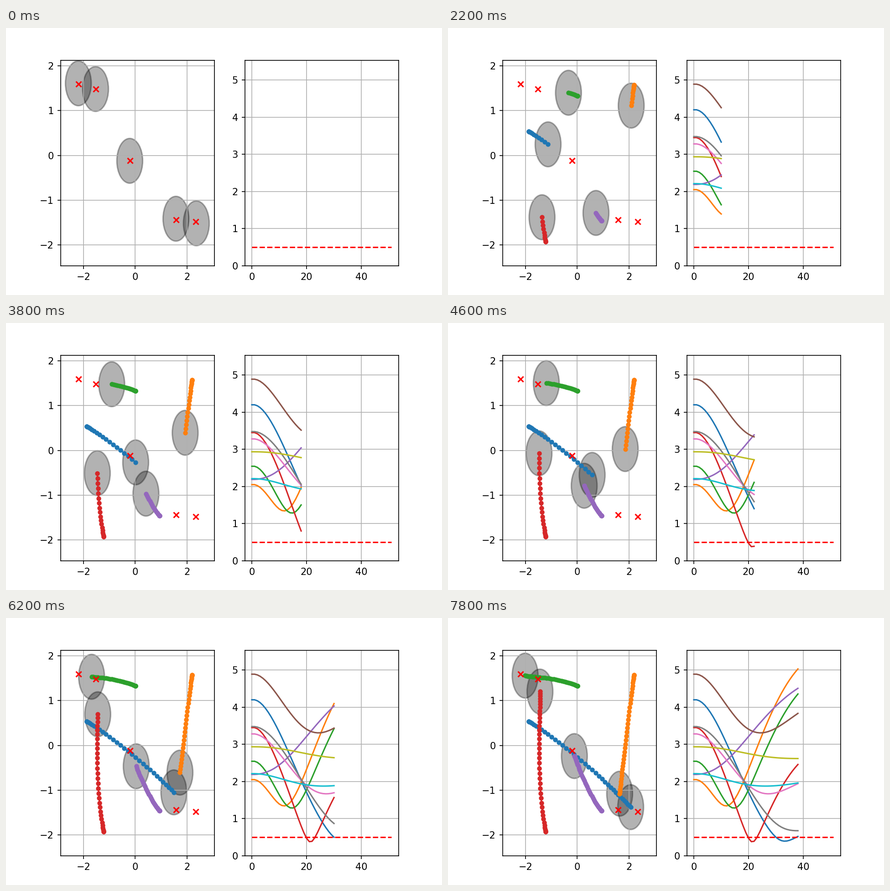
Write a matplotlib script that moves like this. It is 956 px wide and 586 px high and loops after 8000 ms.

```python
from itertools import combinations

import matplotlib.pyplot as plt
import numpy as np
from matplotlib.animation import FuncAnimation

WIDTH, HEIGHT, DPI = 956, 586, 150
FRAMES, INTERVAL = 40, 200
STEPS = 51
RADIUS = 0.5

# Each agent: start, two points on the way (at steps VIA), final position
VIA = (18, 38)
AGENTS = [
    [(-1.877, 0.536), (0.018, -0.266), (2.069, -1.377), (2.365, -1.515)],
    [(2.196, 1.574), (1.933, 0.394), (1.642, -1.077), (1.576, -1.413)],
    [(0.020, 1.325), (-0.908, 1.478), (-2.016, 1.559), (-2.200, 1.610)],
    [(-1.220, -1.927), (-1.467, -0.507), (-1.441, 1.203), (-1.534, 1.483)],
    [(0.943, -1.461), (0.415, -0.965), (-0.110, -0.237), (-0.211, -0.120)],
]
GOALS = np.array([(-2.190, 1.590), (-1.517, 1.478), (-0.202, -0.115),
                  (1.589, -1.438), (2.348, -1.479)])


def progress(step):
    """Share of the run; the agents stand still during the first step."""
    return np.abs(np.asarray(step) - 0.5) / (STEPS - 0.5)


def smooth_path(points, steps):
    """Quintic through the points, at rest at both ends."""
    points = np.array(points)
    powers = np.arange(2, 6)
    u = progress([*VIA, STEPS])
    system = np.vstack([u[:, None] ** powers, powers])
    moves = np.vstack([points[1:] - points[0], [0, 0]])
    coeffs = np.linalg.solve(system, moves)
    return points[0] + progress(steps)[:, None] ** powers @ coeffs


steps = np.arange(STEPS + 1)
paths = [smooth_path(points, steps) for points in AGENTS]
distances = [np.hypot(*(p - q).T) for p, q in combinations(paths, 2)]

fig, (ax_map, ax_dist) = plt.subplots(
    1, 2, figsize=((WIDTH + 1e-6) / DPI, (HEIGHT + 1e-6) / DPI), dpi=DPI)
fig.subplots_adjust(left=0.1251, right=0.9003, bottom=0.1092, top=0.8795,
                    wspace=0.199)

ax_map.set(xlim=(-2.889, 3.058), ylim=(-2.465, 2.127),
           xticks=[-2, 0, 2], yticks=range(-2, 3))
ax_dist.set(xlim=(-2.55, 53.55), ylim=(0, 5.535),
            xticks=[0, 20, 40], yticks=range(6))
for ax in (ax_map, ax_dist):
    ax.grid(True)

discs = [ax_map.add_patch(plt.Circle(p[-1], RADIUS, color="k", alpha=0.3, lw=1.5))
         for p in paths]
trails = [ax_map.plot([], [], "o-", ms=4)[0] for _ in paths]
ax_map.plot(*GOALS.T, "rx", ms=6, mew=1.5)

curves = [ax_dist.plot([], [])[0] for _ in distances]
ax_dist.plot([0, STEPS], [RADIUS, RADIUS], "r--")


def draw(frame):
    """Frame 0 shows the final pose; afterwards the run plays step by step."""
    now = frame - 1
    for disc, trail, path in zip(discs, trails, paths):
        disc.center = path[now]
        trail.set_data(*path[:frame].T)
    for curve, dist in zip(curves, distances):
        curve.set_data(steps[:frame], dist[:frame])
    return discs + trails + curves


anim = FuncAnimation(fig, draw, frames=FRAMES, init_func=lambda: draw(0),
                     interval=INTERVAL, repeat=True, repeat_delay=0)
plt.show()
```
